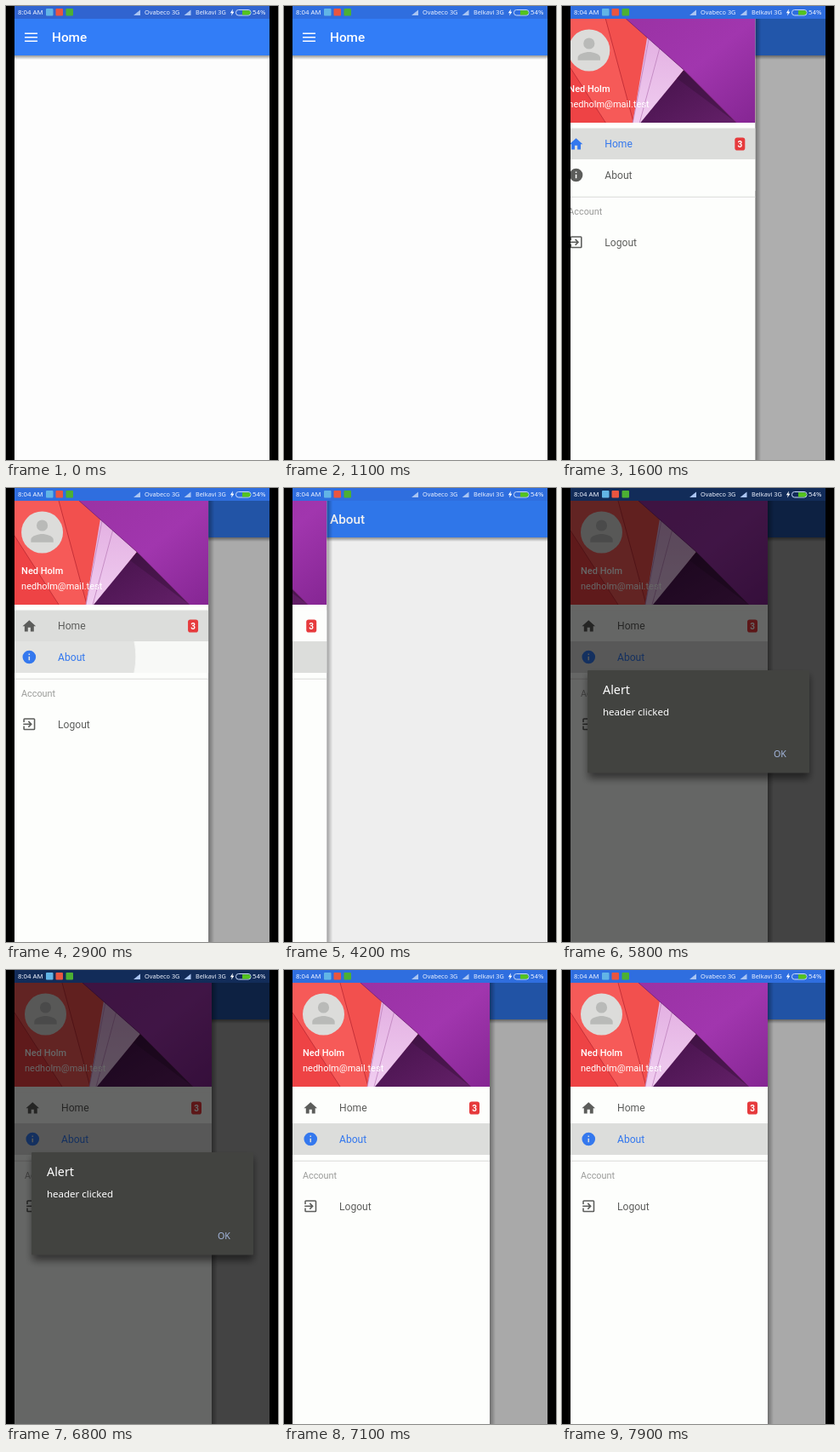
These frames come from a looping animation (320x533 px, 8000 ms). An HTML page:

```html
<!DOCTYPE html>
<html lang="en">
<head>
<meta charset="utf-8">
<title>Navigation drawer</title>
<style>
  html, body { margin: 0; width: 100%; height: 100%; overflow: hidden; background: #000; }
  svg { display: block; width: 100%; height: 100%; }
  text { font-family: Roboto, sans-serif; font-size: 12.1px; white-space: pre; }
  .title { font-size: 15.3px; font-weight: 500; fill: #fff; }
  .status text { font: 7.3px "Noto Sans", sans-serif; fill: #eef3ff; }
  .dialog text { font-family: "Noto Sans", sans-serif; fill: #fff; }

  .drawer, .scrim { animation: 8s cubic-bezier(.23, 1, .32, 1) infinite; }
  .drawer { animation-name: slide; }
  .scrim { animation-name: shade; }
  .alert, .ripple { animation: 8s linear infinite; }
  .alert { animation-name: alert; }
  .ripple { animation-name: ripple; }
  .bar, .home-title, .about-title, .home, .about, .home-row, .about-row {
    animation: 8s step-end infinite;
  }
  .bar { animation-name: bar; }
  .home-title { animation-name: first; }
  .about-title { animation-name: second; }
  .home { animation-name: deselect; }
  .about { animation-name: select; }
  .home-row { animation-name: home-row; }
  .about-row { animation-name: about-row; }

  /* opens at 1385 ms, closes at 2899 ms, opens again at 4180 ms */
  @keyframes slide {
    0%, 17.3125%, 42.6375%, 52.25% { transform: translateX(-232px); visibility: hidden; }
    23.7125%, 36.2375%, 58.65%, 100% { transform: translateX(0); visibility: visible; }
  }
  @keyframes shade {
    0%, 17.3125%, 42.6375%, 52.25% { opacity: 0; }
    23.7125%, 36.2375%, 58.65%, 100% { opacity: 1; }
  }
  @keyframes alert {
    0%, 70%, 87.7%, 100% { opacity: 0; }
    72.5%, 85.2% { opacity: 1; }
  }
  @keyframes ripple {
    0%, 34.4% { r: 0; opacity: 1; }
    36.25% { r: 90px; opacity: 1; }
    37.2% { r: 190px; opacity: 1; }
    37.3%, 100% { r: 190px; opacity: 0; }
  }
  @keyframes bar { 0% { fill: #3064d0; } 6.25%, 100% { fill: #2f6edf; } }
  @keyframes first { 0% { opacity: 1; } 36.8%, 100% { opacity: 0; } }
  @keyframes second { 0% { opacity: 0; } 36.8%, 100% { opacity: 1; } }
  @keyframes deselect { 0% { fill: #3478ee; } 35.8%, 100% { fill: #5c5d5b; } }
  @keyframes select { 0% { fill: #5c5d5b; } 35.8%, 100% { fill: #3478ee; } }
  @keyframes home-row { 0% { fill: #dcdddb; } 37.2%, 100% { fill: #fdfefc; } }
  @keyframes about-row {
    0% { fill: #fdfefc; }
    34.4% { fill: #f8f9f7; }
    37.2%, 100% { fill: #dcdddb; }
  }
</style>
</head>
<body>
<svg viewBox="0 0 320 533" preserveAspectRatio="none">
  <defs>
    <clipPath id="screen"><path d="M10 0h300v533H10z"/></clipPath>
    <clipPath id="row"><path d="M10 180h232v37H10z"/></clipPath>
    <clipPath id="cover"><path d="M10 15h232v122H10z"/></clipPath>
    <linearGradient id="below" x2="0" y2="1">
      <stop stop-opacity=".4"/><stop offset="1" stop-opacity="0"/>
    </linearGradient>
    <linearGradient id="beside">
      <stop stop-opacity=".34"/><stop offset="1" stop-opacity="0"/>
    </linearGradient>
    <linearGradient id="purple" x2="1" y2="1">
      <stop stop-color="#9a32a4"/><stop offset=".5" stop-color="#a136ae"/><stop offset="1" stop-color="#852693"/>
    </linearGradient>
    <linearGradient id="plum" x2="1" y2="1">
      <stop stop-color="#431148"/><stop offset="1" stop-color="#642069"/>
    </linearGradient>
    <linearGradient id="pink" x2="0" y2="1">
      <stop stop-color="#e3b0e2"/><stop offset="1" stop-color="#f0cdf0"/>
    </linearGradient>
    <filter id="soft" x="-20%" y="-20%" width="140%" height="150%"><feGaussianBlur stdDeviation="5"/></filter>
  </defs>

  <rect width="320" height="533"/>
  <g clip-path="url(#screen)">
    <rect x="10" width="300" height="533" fill="#fdfdfd"/>
    <rect x="10" y="58" width="300" height="5" fill="url(#below)"/>
    <rect x="10" y="15" width="300" height="43" fill="#327df7"/>
    <path d="M22 32.2h15M22 36.7h15M22 41.2h15" stroke="#fff" stroke-width="1.6"/>
    <text class="title home-title" x="54" y="42">Home</text>
    <text class="title about-title" x="54" y="42">About</text>
    <rect class="scrim" x="10" y="15" width="300" height="518" fill="rgba(0,0,0,.335)"/>

    <g class="drawer">
      <rect x="242" y="15" width="7" height="518" fill="url(#beside)"/>
      <rect x="10" y="15" width="232" height="518" fill="#fdfefc"/>

      <g clip-path="url(#cover)">
        <rect x="10" y="15" width="232" height="122" fill="#f2504e"/>
        <path d="M10 15h56l33 122H66L10 50z" fill="#f65a58"/>
        <path d="M10 50l56 87H10z" fill="#ee4345"/>
        <path d="M66 15l33 122M10 50l56 87" fill="none" stroke="#c53038"/>
        <path d="M115 36l43 39-49 62H98z" fill="url(#pink)"/>
        <path d="M117 38l-19 99M130 48l-24 89" fill="none" stroke="#bd80bb" stroke-width=".8"/>
        <path d="M158 75l62 62H107z" fill="url(#plum)"/>
        <path d="M158 75l-8 10 70 52z" fill="#351039" opacity=".45"/>
        <path d="M90 15h152v122h-22l-62-62z" fill="url(#purple)"/>
        <path d="M90 15l68 60 62 62" fill="none" stroke="#6c1f78" stroke-width=".8"/>
      </g>

      <circle cx="46.5" cy="52" r="24.5" fill="#dcdcda"/>
      <path transform="translate(26.7 30.8) scale(1.65)" fill="#b9bab8"
        d="M12 12a4 4 0 1 0 0-8 4 4 0 0 0 0 8zm0 2c-2.67 0-8 1.34-8 4v2h16v-2c0-2.66-5.33-4-8-4z"/>
      <text x="22" y="101" fill="#fff" font-weight="500" style="font-size:11px">Ned Holm</text>
      <text x="22" y="119" fill="#fff" style="font-size:11px">nedholm@mail.test</text>

      <rect class="home-row" x="10" y="143.5" width="232" height="36.5"/>
      <rect class="about-row" x="10" y="180" width="232" height="37"/>
      <g clip-path="url(#row)"><circle class="ripple" cx="65" cy="198" fill="#e2e3e1"/></g>

      <g class="home">
        <path transform="translate(21.9 152.9) scale(.78)" d="M10 20v-6h4v6h5v-8h3L12 3 2 12h3v8z"/>
        <text x="65" y="166.3">Home</text>
      </g>
      <rect x="218" y="154.5" width="12" height="15" rx="2.8" fill="#e63b3d"/>
      <text x="224" y="165.5" text-anchor="middle" fill="#fff" font-weight="700" style="font-size:10px">3</text>
      <g class="about">
        <path transform="translate(21.9 189.1) scale(.78)" fill-rule="evenodd"
          d="M12 2a10 10 0 1 0 0 20 10 10 0 0 0 0-20zm1 15h-2v-6h2zm0-8h-2V7h2z"/>
        <text x="65" y="203">About</text>
      </g>
      <path d="M10 224.2h232" stroke="#d9dad8"/>
      <text x="22" y="245" fill="#999a98" style="font-size:10.8px">Account</text>
      <g fill="#5c5d5b">
        <path transform="translate(21.9 267.9) scale(.78)"
          d="M10.09 15.59L11.5 17l5-5-5-5-1.41 1.41L12.67 11H3v2h9.67zM19 3H5a2 2 0 0 0-2 2v4h2V5h14v14H5v-4H3v4a2 2 0 0 0 2 2h14a2 2 0 0 0 2-2V5a2 2 0 0 0-2-2z"/>
        <text x="65" y="282">Logout</text>
      </g>
    </g>

    <rect class="bar" x="10" width="300" height="15"/>

    <g class="alert dialog">
      <rect x="10" width="300" height="533" opacity=".6"/>
      <rect x="31" y="220" width="260" height="121" opacity=".5" filter="url(#soft)"/>
      <rect x="30" y="214" width="261" height="120.5" rx="1" fill="#424340"/>
      <text x="48" y="242" style="font-size:14.3px">Alert</text>
      <text x="48" y="267" style="font-size:11.5px">header clicked</text>
      <text x="249" y="316" style="font-size:10.7px;fill:#a3b6dc">OK</text>
    </g>

    <g class="status">
      <text x="14" y="9.8" style="font-size:7.8px">8:04 AM</text>
      <rect x="47" y="3" width="8.5" height="8.5" rx="1" fill="#62b5e6"/>
      <rect x="58.5" y="3" width="8.5" height="8.5" rx="1" fill="#ea5540"/>
      <rect x="70.5" y="3" width="8.5" height="8.5" rx="1" fill="#4cb033"/>
      <path d="M150 11h8V4.5zM209.500 11h8V4.5z" fill="#a9c4f2"/>
      <text x="163" y="9.8">Ovabeco 3G</text>
      <text x="223" y="9.8">Belkavi 3G</text>
      <path d="M267 3.5l-3.2 4.8h2l-.8 3.2 3.4-4.7h-2z" fill="#fff"/>
      <rect x="270.5" y="4.5" width="17.5" height="6.5" rx="3" fill="none" stroke="#c9dafa"/>
      <path d="M278 5.2h7a2.500 2.500 0 0 1 0 5.200h-7z" fill="#55c41e"/>
      <text x="290" y="9.8" style="font-size:7.8px">54%</text>
    </g>
  </g>
</svg>
</body>
</html>
```
